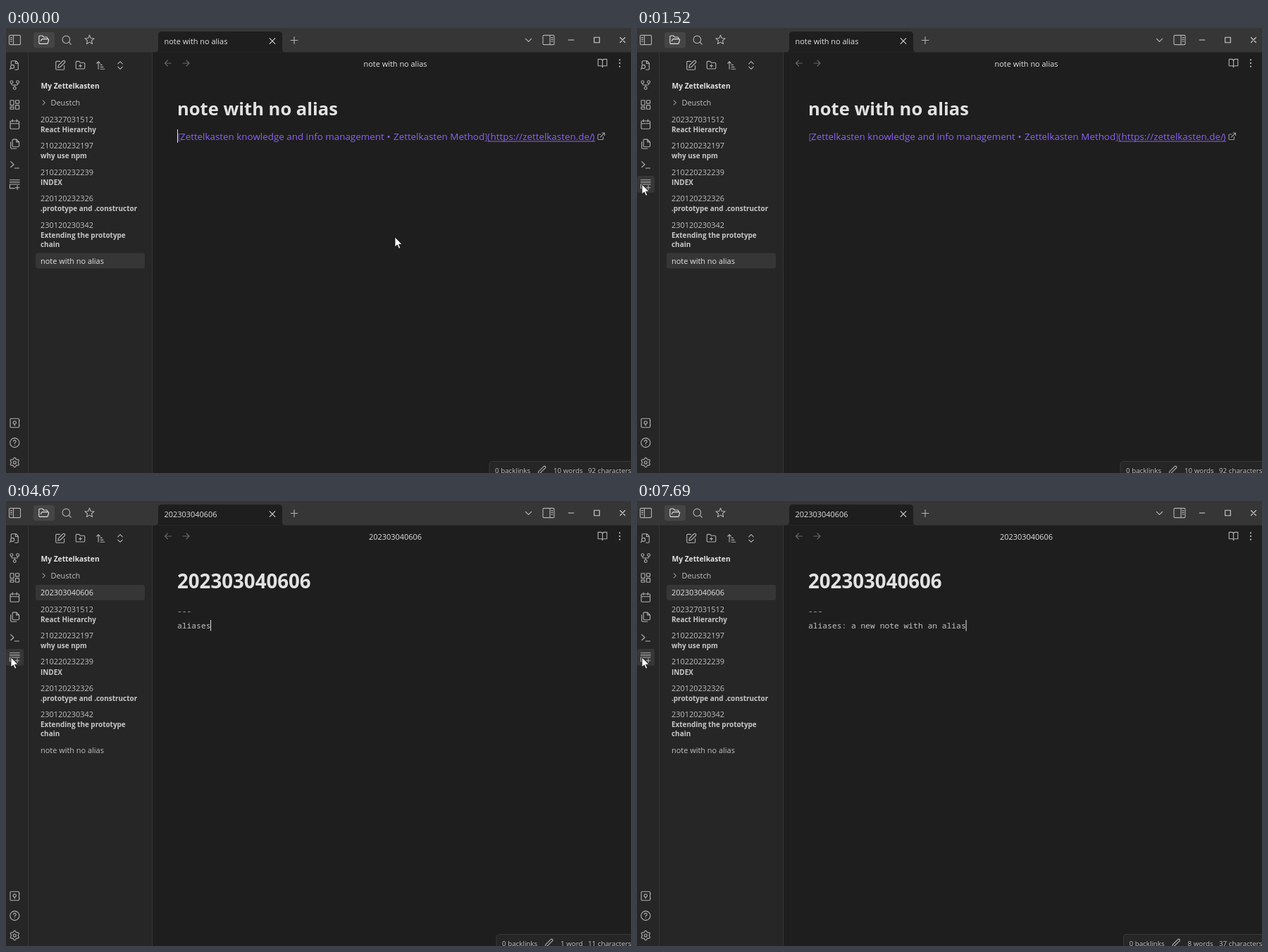
Animation, 887 px wide and 632 px high, one loop 8000 ms. Source, as an HTML page:

```html
<!DOCTYPE html>
<html lang="en">
<head>
<meta charset="utf-8">
<title>Note editor</title>
<style>
html, body { margin: 0; width: 100%; height: 100%; overflow: hidden; background: #1e1e1e; }
svg { display: block; width: 100%; height: 100%; font: 10.95px "Open Sans", "Noto Sans", sans-serif; }
.icon { fill: none; stroke-linecap: round; stroke-linejoin: round; }
.bold { font-weight: 700; font-size: 9.95px; }
.mono { font: 11.3px "Noto Sans Mono", "DejaVu Sans Mono", monospace; }
.link { font-size: 13.4px; }
.status { font-size: 9.8px; }
</style>
</head>
<body>
<svg viewBox="0 0 887 632"><g id="base"></g><g id="live"></g></svg>
<script>
const LOOP = 8000;
const OPEN_NOTE = 1590, BODY_FOCUS = 2570, FRONT_MATTER = 3210, NEW_LINE = 3470;
const COL = 6.79, LEFT = 243;
const BRIGHT = '#e2e2e2', SOFT = '#c0c0c0', PURPLE = '#8b62f2';
const LINE = 'aliases: a new note with an alias';
const DASH_TIMES = [2980, 3060, 3130];
const KEY_TIMES = [
  3720, 3720, 3890, 4040, 4180, 4510, 4670, 4830, 5000, 5150, 5310, 5390, 5460,
  5620, 5700, 5780, 5850, 5930, 6010, 6170, 6250, 6330, 6410, 6560, 6640,
  6800, 6960, 7120, 7300, 7370, 7530, 7610, 7690
];
const PATH = [
  [0, 552, 297], [160, 552, 302], [250, 551, 309], [410, 530, 322], [489, 496, 334],
  [568, 452, 340], [700, 350, 335], [850, 190, 302], [1000, 60, 255], [1110, 7, 222]
];

const rect = (x, y, w, h, fill, rx = 0) =>
  `<rect x="${x}" y="${y}" width="${w}" height="${h}" rx="${rx}" fill="${fill}"/>`;
const text = (x, y, s, fill = SOFT, attrs = '') =>
  `<text x="${x}" y="${y}" fill="${fill}" ${attrs}>${s}</text>`;
// Icon paths live in a 24-unit box centred on x, y.
const icon = (x, y, d, size = 15, color = '#b0b0b0') =>
  `<path class="icon" d="${d}" stroke="${color}" stroke-width="${27 / size}"
    transform="translate(${x} ${y}) scale(${size / 24}) translate(-12 -12)"/>`;
const ring = (x, y, r) => `M${x - r} ${y}a${r} ${r} 0 1 0 ${2 * r} 0a${r} ${r} 0 1 0 ${-2 * r} 0`;
const box = (x, y, w, h = w, r = 2) =>
  `M${x + r} ${y}h${w - 2 * r}q${r} 0 ${r} ${r}v${h - 2 * r}q0 ${r} ${-r} ${r}h${2 * r - w}` +
  `q${-r} 0 ${-r} ${-r}v${2 * r - h}q0 ${-r} ${r} ${-r}z`;
const polar = (n, radius) => 'M' + Array.from({ length: n }, (_, i) => {
  const a = i / n * 2 * Math.PI - Math.PI / 2, r = radius(i);
  return `${(12 + r * Math.cos(a)).toFixed(2)} ${(12 + r * Math.sin(a)).toFixed(2)}`;
}).join('L') + 'z';

const CROSS = 'M5 5l14 14M19 5L5 19';
const PENCIL = 'M17 3a2.8 2.8 0 1 1 4 4L7.5 20.5 2 22l1.5-5.5z';
const FILE = 'M4 9V4q0-2 2-2h9l5 5v13q0 2-2 2h-5M14 2v6h6';
const FOLDER = 'M4 20q-2 0-2-2V5q0-2 2-2h5l3 3h8q2 0 2 2v10q0 2-2 2z';

const RIBBON = [
  [53, FILE + ring(7, 15, 4) + 'M4 18l-3 3'],
  [81, ring(12, 19, 3) + ring(5, 5, 3) + ring(19, 5, 3) + 'M5 8v2q0 2 2 2h10q2 0 2-2V8M12 12v4'],
  [109, box(2, 2, 8, 11, 1) + box(14, 2, 8, 7, 1) + box(14, 13, 8, 9, 1) + box(2, 17, 8, 5, 1)],
  [137, box(2, 4, 20, 18) + 'M7 1v5M17 1v5M2 10h20'],
  [165, 'M15 1H9q-2 0-2 2v13q0 2 2 2h11q2 0 2-2V7l-6-6v6h6M3 7v13q0 2 2 2h11'],
  [194, 'M3 18l7-6-7-7M12 20h10'],
  [222, 'M1 2h22M1 7h22M23 12H1v9h11M18 15v9M13.5 19.500h9'],
  [561, box(2, 2, 20) + ring(12, 11, 3.5) + 'M12 14v4M22 7h1M22 17h1'],
  [589, ring(12, 12, 10.5) + 'M9 9a3 3 0 1 1 4 3q-1 .6-1 2M12 17.5v.2'],
  [617, polar(48, i => 9.3 + 1.6 * Math.cos(i / 48 * 12 * Math.PI)) + ring(12, 12, 3.2)]
];
const TOOLS = [
  [53.5, 17, 'M6 14l1.5-3q.7-1 2-1H21q2 0 1.6 2L21 18q-.5 2-2 2H4q-2 0-2-2V5q0-2 2-2h5l3 3h6q2 0 2 2v2', 16, BRIGHT],
  [86, 17, ring(11, 11, 8.5) + 'M22 22l-5-5'],
  [118.5, 17, polar(10, i => i % 2 ? 5 : 11)],
  [378, 18.5, CROSS, 13, '#d0d0d0'],
  [409, 17.5, 'M12 3v18M3 12h18', 13],
  [741.5, 17, 'M5 9l7 7 7-7', 14],
  [770, 17, box(0, 2, 24, 20) + 'M15 2v20M18 7h3M18 11h3M18 15h3', 16],
  [12.5, 17, box(0, 2, 24, 20) + 'M9 2v20M3 7h3M3 11h3M3 15h3', 16],
  [802, 17, 'M5 12h14', 13, '#d0d0d0'],
  [838.5, 17, box(5, 5, 14, 14, 0), 13, '#d0d0d0'],
  [875, 17, CROSS, 12, '#d0d0d0'],
  [77, 53, 'M11 3H4q-2 0-2 2v15q0 2 2 2h15q2 0 2-2v-7M18 2a2.8 2.8 0 1 1 4 4l-10 10-5 1 1-5z'],
  [105.5, 53, FOLDER + 'M12 10v6M9 13h6'],
  [134, 53, 'M3 7l4-4 4 4M7 3v18M12 11h4M12 16h7M12 21h10', 14],
  [162, 53, 'M6 8l6-6 6 6M6 16l6 6 6-6', 13],
  [53.5, 106, 'M9 5l7 7-7 7', 11, '#8a8a8a'],
  [230, 50, 'M21 12H3M11 4l-8 8 8 8', 12, '#666'],
  [255.5, 50, 'M3 12h18M13 4l8 8-8 8', 12, '#666'],
  [846.5, 50, 'M2 3h6q4 0 4 4v14q0-3-3-3H2zM22 3h-6q-4 0-4 4v14q0-3 3-3h7z'],
  [871, 50, ring(12, 4, 1) + ring(12, 12, 1) + ring(12, 20, 1), 14]
];
const ribbonIcons = RIBBON.map(([y, d]) => icon(12.3, y, d)).join('');

function drawBase() {
  return rect(0, 34, 207, 598, '#262626') + rect(0, 0, 887, 34.5, '#363636') +
    rect(31, 34, 1, 598, '#363636') + rect(207, 34, 1, 598, '#363636') +
    rect(39, 6, 30, 22, '#454545', 3) +
    '<path d="M211 34.5q5 0 5-5V10q0-5 5-5h166q5 0 5 5v19.5q0 5 5 5z" fill="#1e1e1e"/>' +
    TOOLS.map(tool => icon(...tool)).join('') +
    text(49.5, 86.3, 'My Zettelkasten', BRIGHT, 'class="bold" style="font-size:10.25px"') +
    text(63.5, 110, 'Deustch');
}

function drawFiles(isNew) {
  const files = [
    [134, '202327031512', 'React Hierarchy'],
    [171.1, '210220232197', 'why use npm'],
    [208.7, '210220232239', 'INDEX'],
    [246, '220120232326', '.prototype and .constructor'],
    [283.5, '230120230342', 'Extending the prototype', 'chain']
  ];
  const shift = isNew ? 23.7 : 0;
  const bold = (y, s) => text(49, y, s, '#c8c8c8', 'class="bold"');
  return rect(42, isNew ? 119 : 319.5, 155, 22, '#363636', 3) +
    (isNew ? text(49, 134, '202303040606', BRIGHT) : '') +
    files.map(([y, id, ...names]) => text(49, y + shift, id) +
      names.map((s, i) => bold(y + shift + 14.2 + 13 * i, s)).join('')).join('') +
    text(49, 334.5 + shift, 'note with no alias', isNew ? SOFT : BRIGHT);
}

function drawStatus(words, chars) {
  const plural = (n, s) => `${n} ${s}${n === 1 ? '' : 's'}`;
  const charX = chars > 9 ? 826 : chars === 1 ? 836 : 831;
  const x = charX - (words > 9 ? 49 : words === 1 ? 39 : 44.5);
  const label = (lx, s) => text(lx, 632, s, SOFT, 'class="status"');
  return `<path d="M${x - 91} 640V620q0-4.5 4.5-4.5H890V640z" fill="#262626" stroke="#383838"/>` +
    label(x - 83, '0 backlinks') + icon(x - 16.5, 627.5, PENCIL, 13) +
    label(x, plural(words, 'word')) + label(charX, plural(chars, 'character'));
}

const caret = (x, y, h) => rect(x, y, 1, h, '#e4e4e4');

function drawLink() {
  const part = (x, s, color = PURPLE) => text(x, 159.3, s, color, 'class="link"');
  const dim = '#6a579a';
  return part(243.5, '[', dim) +
    part(247, 'Zettelkasten knowledge and info management') +
    part(540.5, '•') + part(550, 'Zettelkasten Method') +
    part(679, ']', dim) + part(683, '(') +
    part(687.5, 'https://zettelkasten.de/') + part(831.5, ')') +
    rect(683.5, 160.5, 152.5, 1, PURPLE) +
    icon(844.5, 154, 'M18 13v6q0 2-2 2H5q-2 0-2-2V8q0-2 2-2h6M15 2h7v7M10 14L22 2', 12, '#999');
}

function drawTyping(t) {
  const typed = times => times.filter(k => k <= t).length;
  const dashes = '-'.repeat(typed(DASH_TIMES)), line = LINE.slice(0, typed(KEY_TIMES));
  const mono = t >= FRONT_MATTER, second = t >= NEW_LINE;
  const words = (line.match(/\w+/g) || []).length + line.includes(':');
  let out = mono
    ? text(LEFT, 159.5, dashes, '#b0b0b0', 'class="mono"')
    : text(LEFT, 159.3, dashes, BRIGHT, 'class="link"');
  out += text(LEFT, 180.5, line, '#c4c4c4', 'class="mono"');
  if (line) out += caret(LEFT + COL * line.length - .5, 169, 15.5);
  else if (second) out += caret(LEFT, 165, 19);
  else if (mono) out += caret(LEFT + COL * 3 - .5, 148, 15.5);
  else if (t >= BODY_FOCUS) out += caret(LEFT + 4.3 * dashes.length, 144, 19);
  else if (t < 2080) out += caret(432, 93, 38);
  return out + drawStatus(t < 1760 ? 10 : words, dashes.length + second + line.length);
}

function pointer(t) {
  if (t > 410) t = 410 + Math.floor((t - 410) / 79) * 79;
  else t = t < 160 ? 0 : t < 250 ? 160 : t < 410 ? 250 : 410;
  const i = PATH.findIndex(p => p[0] > t);
  if (i < 0) return PATH.at(-1).slice(1);
  const [t0, x0, y0] = PATH[i - 1], [t1, x1, y1] = PATH[i], k = (t - t0) / (t1 - t0);
  return [x0 + (x1 - x0) * k, y0 + (y1 - y0) * k];
}

function drawPointer(x, y, beam) {
  const stroke = (color, width) =>
    `<path d="M-3.5-7h2.5l1 1 1-1h2.5M0-6v12M-3.5 7h2.5l1-1 1 1h2.5" fill="none"
      stroke="${color}" stroke-width="${width}"/>`;
  const shape = beam
    ? stroke('#eee', 3) + stroke('#111', 1)
    : '<path d="M0 0v14l3.3-3 2.3 5.3 2.2-1-2.3-5.1h4.5z" fill="#fff" stroke="#111" stroke-width=".8"/>';
  return `<g transform="translate(${x} ${y})">${shape}</g>`;
}

function drawLive(t) {
  const isNew = t >= OPEN_NOTE, title = isNew ? '202303040606' : 'note with no alias';
  const [x, y] = pointer(t), blink = t < 410 || t >= 920 && t < 1440;
  const hover = x < 26 && y > 210 && y < 234;
  return drawFiles(isNew) + text(224.5, 23, title, BRIGHT) +
    text(552.5, 54.5, title, BRIGHT, 'text-anchor="middle"') +
    text(LEFT, 124, title, BRIGHT, `style="font-weight:700;font-size:${isNew ? 27.7 : 25.55}px"`) +
    (isNew ? drawTyping(t)
      : drawLink() + (blink ? caret(LEFT, 144, 19) : '') + drawStatus(10, 92)) +
    (hover ? rect(0, 210, 25, 24, '#363636', 3) : '') +
    ribbonIcons + drawPointer(x, y, x > 208 && t >= 250);
}

const live = document.getElementById('live');
document.getElementById('base').innerHTML = drawBase();
let shown = '';
function frame() {
  const next = drawLive(performance.now() % LOOP);
  if (next !== shown) live.innerHTML = shown = next;
  requestAnimationFrame(frame);
}
frame();
</script>
</body>
</html>
```
